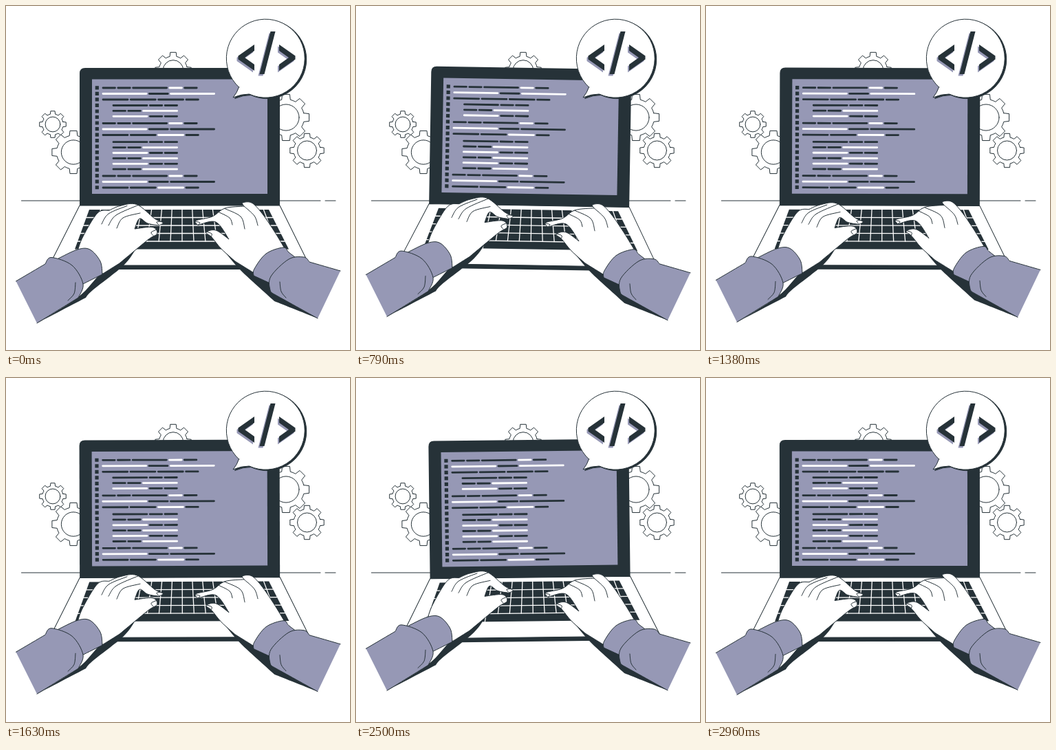
An HTML page that plays this animation: 500x500 px, repeating every 3000 ms.

```html
<!DOCTYPE html>
<html lang="en">
<head>
<meta charset="utf-8">
<title>Typing on a laptop</title>
<style>
  html, body { margin: 0; width: 100%; height: 100%; overflow: hidden; background: #fff; }
  svg { display: block; width: 100%; height: 100%; }
</style>
</head>
<body>
<svg id="stage" viewBox="0 0 500 500"></svg>
<script>
const DARK = '#263238', LILAC = '#9698b5', WHITE = '#fff';
const LOOP = 3000;
const stage = document.getElementById('stage');

function add(parent, tag, attrs = {}) {
  const node = document.createElementNS('http://www.w3.org/2000/svg', tag);
  for (const key in attrs) node.setAttribute(key, attrs[key]);
  return parent.appendChild(node);
}
const group = () => add(stage, 'g', { 'stroke-linejoin': 'round', 'stroke-linecap': 'round' });
const shape = (parent, d, fill, stroke = 'none', width = 1) =>
  add(parent, 'path', { d, fill, stroke, 'stroke-width': width });
const line = (parent, d, stroke = DARK, width = 1) => shape(parent, d, 'none', stroke, width);
const mix = (a, b, k) => a + (b - a) * k;

// Smooth path through key points; '|' marks a sharp corner.
function curve(spec) {
  let path = '', last = null;
  for (const part of spec.split('|')) {
    const pts = part.trim().split(' ').map(p => p.split(',').map(Number));
    if (last) pts.unshift(last);
    else path = `M${pts[0]}`;
    for (let i = 0; i < pts.length - 1; i++) {
      const [a, b, c, d] = [pts[i - 1] || pts[i], pts[i], pts[i + 1], pts[i + 2] || pts[i + 1]];
      const c1 = b.map((v, k) => v + (c[k] - a[k]) / 6);
      const c2 = c.map((v, k) => v - (d[k] - b[k]) / 6);
      path += `C${c1} ${c2} ${c}`;
    }
    last = pts[pts.length - 1];
  }
  return path;
}

function gear(parent, x, y, radius) {
  const body = radius * 0.78, teeth = 8;
  const at = (r, angle) => `${x + r * Math.cos(angle)},${y + r * Math.sin(angle)}`;
  let d = '';
  for (let i = 0; i < teeth; i++) {
    const mid = i * 2 * Math.PI / teeth;
    d += `${i ? `A${body} ${body} 0 0 1 ` : 'M'}${at(body, mid - 0.24)}`;
    d += `L${at(radius, mid - 0.16)}L${at(radius, mid + 0.16)}L${at(body, mid + 0.24)}`;
  }
  shape(parent, `${d}A${body} ${body} 0 0 1 ${at(body, -0.24)}Z`, WHITE, DARK);
  add(parent, 'circle', { cx: x, cy: y, r: radius * 0.56, fill: WHITE, stroke: DARK });
}

function drawBackdrop() {
  const g = group();
  line(g, 'M22.500 283H457M464 283H479');
  gear(g, 243, 93.5, 26.5);
  gear(g, 68, 172, 19.5);
  gear(g, 98, 212.5, 31.5);
  gear(g, 407, 162, 34);
  gear(g, 437.5, 210, 25);
}

function drawKeyboard(g) {
  const top = 296, bottom = 353.5, rows = 5;
  shape(g, `M121 ${top}H382L411 ${bottom}H100Z`, DARK);
  for (let row = 1; row < rows; row++) {
    const k = row / rows, y = mix(top, bottom, k);
    line(g, `M${mix(121, 100, k)} ${y}H${mix(382, 411, k)}`, WHITE, 1.3);
  }
  // Column lines fan out; the bottom row is solid under the middle ones.
  for (let col = -8; col <= 8; col++) {
    const k = Math.abs(col) < 4 ? (rows - 1) / rows : 1;
    line(g, `M${256 + col * 14.8} ${top}L${256 + col * mix(14.8, 17.5, k)} ${mix(top, bottom, k)}`, WHITE, 1.3);
  }
}

// One letter per dash, named by length; capitals are white.
const DASH = { s: 17.5, k: 27, m: 36, l: 49, x: 63 };
const BLOCKS = [
  { x: 141, y: 119, pitch: 8.5, rows: 'sslSs XkX mmms' },
  { x: 156, y: 144.5, pitch: 7.9, rows: 'lss ssL Lss' },
  { x: 141, y: 170.5, pitch: 8.5, rows: 'sslSs Xkx mmMs' },
  { x: 156, y: 197.7, pitch: 7.9, rows: 'lss ssL Lss ssL Lss ssL' },
  { x: 141, y: 247, pitch: 8.5, rows: 'sslSs Xkx mmMs' }
];

function drawCode(g) {
  for (let i = 0; i < 18; i++)
    add(g, 'rect', { x: 129.7, y: 116.3 + i * 8.52, width: 5.2, height: 5.2, fill: DARK });
  for (const block of BLOCKS) {
    block.rows.split(' ').forEach((row, i) => {
      let x = block.x;
      for (const letter of row) {
        const name = letter.toLowerCase();
        line(g, `M${x} ${block.y + i * block.pitch}h${DASH[name]}`, letter === name ? DARK : WHITE, 2.8);
        x += DASH[name] + 4.3;
      }
    });
  }
}

function drawLaptop() {
  const g = group();
  shape(g, 'M107 290H398L441 377H63Z', WHITE, DARK);
  shape(g, 'M63 377H441L436 383H68Z', DARK);
  drawKeyboard(g);
  shape(g, 'M107 290V98Q107 90 115 90H391Q398 90 398 97V290Z', DARK);
  shape(g, 'M125 106.500H380V273H125Z', LILAC);
  drawCode(g);
  return g;
}

function drawArm({ shadow, hand, creases, cuff, sleeve, fold }) {
  const g = group();
  shape(g, curve(shadow) + 'Z', DARK);
  shape(g, curve(hand) + 'Z', WHITE, DARK);
  creases.forEach(c => line(g, curve(c)));
  shape(g, curve(cuff) + 'Z', LILAC, DARK);
  shape(g, curve(sleeve) + 'Z', LILAC);
  line(g, curve(sleeve));
  line(g, curve(fold));
  return g;
}

const LEFT_ARM = {
  shadow: '45,461 | 105,423 141,386 190,351 | 171,377 126,413 116,424 | 45,461',
  hand: '104,356 112,335 133,301 150,297 | 166,290.5 190,288.5 216,309 228,315 222,319 | 206,316 194,309 187,324 | 213,321.5 219.5,331 206,340 165,374 | 141,389',
  creases: [
    '139,317 149,302 176,290.5',
    '149,319 160,304 192,289.5',
    '161,323 170,308 195,301',
    '227,313 219,314 222,318',
    '219,325 211,329 214,333.5'
  ],
  cuff: '76,367 | 104,354 122,354 137,371 140,390 | 112,404',
  sleeve: '14.5,400 | 57,375 | 66,365.5 96,377 112,404 105,424 | 45,461',
  fold: '101,402 99,418 90,428'
};

const RIGHT_ARM = {
  shadow: '453,454 | 384,403 | 313,351 | 339,382 369,410 390,429 | 453,454',
  hand: '406,354 389,326 371,300 357,286 344,286 346,291 | 318,294 300,306 276,312 279,318.5 | 305,314 324,339 | 305,326 291,329 299,336 313,353 333,371 | 362,389',
  creases: [
    '346,291 361,305 366,319',
    '318,294.5 341,306 347,324',
    '309,299.5 325,308 329,318',
    '275,313 282,315 279,318',
    '291,328 299,331 298,335.5'
  ],
  cuff: '424,368 | 411,358 403,351 378,360 361,382 360,392 | 384,403',
  sleeve: '486,385 | 441,372 | 433,365 411,368 385,393 384,413 390,419 | 453,454',
  fold: '398,401 400,415 407,424'
};

function drawBubble() {
  const g = group();
  const outline = 'M338.500 118A57 57 0 1 1 353.500 128Q342 128 330 133Q336 126 338.500 118Z';
  const bracket = 'M-8 -19V-10L-22 0L-8 10V19L-31.500 2.500V-2.500Z';
  const shifted = (parent, x, y) => add(parent, 'g', { transform: `translate(${x} ${y})` });
  shape(shifted(g, 2.5, 1.5), outline, DARK, DARK);
  shape(g, outline, WHITE, DARK);
  for (const [x, y, color] of [[-2, 2.5, LILAC], [0, 0, DARK]]) {
    const glyphs = shifted(g, 379 + x, 75 + y);
    shape(shifted(glyphs, -10, 0), bracket, color);
    shape(shifted(glyphs, 10, 0), bracket, color).setAttribute('transform', 'scale(-1 1)');
    shape(glyphs, 'M5.500 -38H12.500L-3.500 24H-10.500Z', color);
  }
}

drawBackdrop();
const laptop = drawLaptop();
const leftArm = drawArm(LEFT_ARM);
const rightArm = drawArm(RIGHT_ARM);
drawBubble();

// 0 to 1 and back within one cycle.
const triangle = phase => 1 - Math.abs(1 - 2 * (((phase % 1) + 1) % 1));

function render(ms) {
  const t = ms % LOOP / LOOP;
  const tilt = 2 * triangle(t + 0.25) - 1;
  const lift = 10 * triangle(2 * t);
  const drop = 10 * (2 / 3 - triangle(2 * t - 1 / 3));
  laptop.setAttribute('transform', `rotate(${tilt} 252 237)`);
  leftArm.setAttribute('transform', `translate(0 ${-lift})`);
  rightArm.setAttribute('transform', `translate(0 ${drop})`);
}

const start = performance.now();
function tick() {
  render(performance.now() - start);
  requestAnimationFrame(tick);
}
tick();
</script>
</body>
</html>
```
